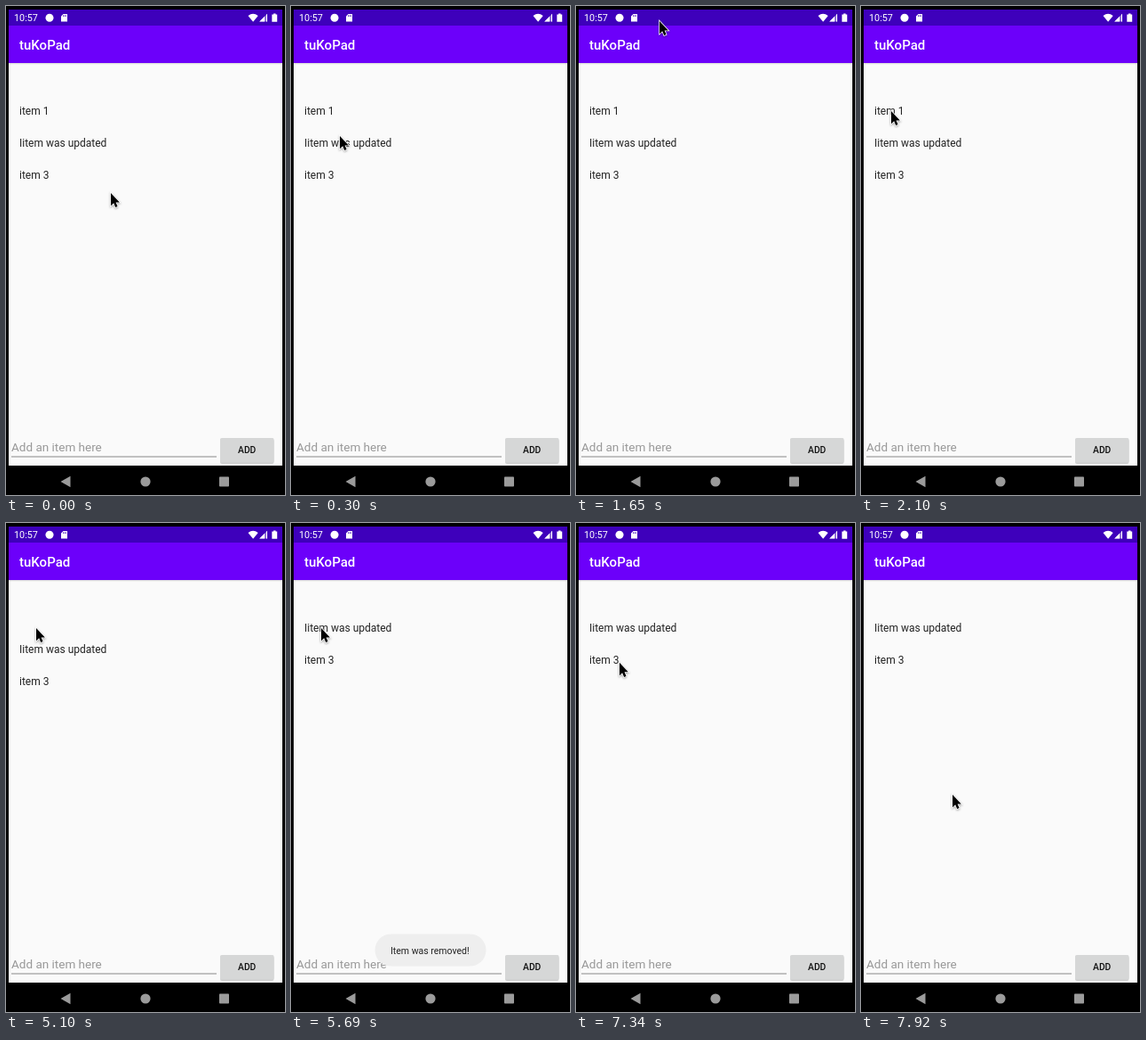
Write an HTML page that moves like this. It is 314 by 549 pixels and loops after 8 s.

```html
<!DOCTYPE html>
<html lang="en">
<head>
<meta charset="utf-8">
<title>List app</title>
<style>
  html, body { margin: 0; width: 100%; height: 100%; overflow: hidden; background: #000; }
  svg { display: block; width: 100vw; height: 100vh; font-family: Roboto, sans-serif; }
  .row { font-size: 12px; fill: #222; }
  .bold { font-weight: 500; }
  #cursor { filter: drop-shadow(0 1px 1px rgba(0, 0, 0, .35)); }
</style>
</head>
<body>
<svg viewBox="0 0 314 549">
  <defs>
    <linearGradient id="shade" x2="0" y2="1">
      <stop stop-color="#000" stop-opacity=".15"/>
      <stop offset="1" stop-color="#000" stop-opacity="0"/>
    </linearGradient>
  </defs>
  <rect width="314" height="549"/>
  <rect x="3" y="4" width="308" height="512" fill="#fafafa"/>
  <rect x="3" y="4" width="308" height="18" fill="#3e00bb"/>
  <rect x="3" y="22" width="308" height="42" fill="#6c00fa"/>
  <rect x="3" y="64" width="308" height="2" fill="url(#shade)"/>

  <g fill="#fff">
    <text x="9" y="17" font-size="10.8">10:57</text>
    <circle cx="49" cy="13.2" r="4.5"/>
    <path d="M64.5 9H69V17.6H62V11.6Z"/>
    <path d="M64.6 10.2V12M66 10.2V12M67.4 10.2V12" stroke="#3e00bb" stroke-width=".7"/>
    <path d="M272.5 11Q278 6.4 283.7 11L278.1 17.8Z"/>
    <path d="M285.2 17.6L294 8.8V17.6Z" opacity=".45"/>
    <path d="M285.2 17.6L291 11.8V17.6ZM293 9.8L294 8.8V17.6H293Z"/>
    <path d="M299.3 9.6H301V8.6H303.6V9.6H305.2V17.8H299.3Z"/>
    <text class="bold" x="15" y="49" font-size="15">tuKoPad</text>
  </g>

  <text id="first" class="row" x="15" y="122">item 1</text>
  <g id="rest" class="row">
    <text x="15" y="122">Iitem was updated</text>
    <text x="15" y="158">item 3</text>
  </g>

  <text x="6" y="500" font-size="13.5" fill="#999">Add an item here</text>
  <path d="M6 506H237" stroke="#888"/>
  <rect x="241" y="486" width="60.5" height="28" rx="2" opacity=".18"/>
  <rect x="241" y="485" width="60.5" height="27.7" rx="1.7" fill="#d6d7d7"/>
  <text class="bold" x="271.2" y="502" font-size="10.3" text-anchor="middle" fill="#111">ADD</text>

  <g fill="#9b9b9b">
    <path d="M61.5 534L72.5 527.8V540.2Z"/>
    <circle cx="157" cy="534" r="5.6"/>
    <rect x="240" y="528.6" width="11" height="11" rx=".8"/>
  </g>

  <g id="toast">
    <rect x="94.5" y="461.5" width="125" height="36" rx="18" fill="#eee"/>
    <text x="112" y="484" font-size="10.5" fill="#222">Item was removed!</text>
  </g>

  <path id="cursor" d="M1 1V15.3L4.2 12.3L6.2 17.1L8.6 16.1L6.6 11.4H10.9Z" stroke="#fff" stroke-width="1.5" paint-order="stroke"/>
</svg>
<script>
  const LOOP = 8000, STEP = 145, ROW = 36;
  const HOME = [117, 209];
  // Cursor moves along curves: start ms, number of steps, bend point, end point.
  const legs = [
    { start: 150, steps: 2, bend: [75, 160], end: [54, 145] },
    { start: 750, steps: 3, bend: [458, 396], end: [89, 105] },
    { start: 1350, steps: 6, bend: [125, -79], end: [33, 117] },
    { start: 6290, steps: 6, bend: [120, 121], end: [104, 117] },
    { start: 7340, steps: 5, bend: [-71, 215], end: [102, 304] }
  ];

  const el = id => document.getElementById(id);
  const move = (id, x, y) => el(id).setAttribute("transform", `translate(${x} ${y})`);
  const fade = (id, opacity) => el(id).setAttribute("opacity", opacity);

  // Rises from 0 to 1 in equal jumps, the first one at start.
  const ramp = (t, start, steps) =>
    t < start ? 0 : Math.min(1, (Math.floor((t - start) / STEP) + 1) / steps);

  const curve = (a, b, c, u) =>
    a.map((v, i) => (1 - u) ** 2 * v + 2 * u * (1 - u) * b[i] + u * u * c[i]);

  const cursorAt = t => legs.reduce(
    (from, { start, steps, bend, end }) => curve(from, bend, end, ramp(t, start, steps)), HOME);

  function draw(t) {
    move("cursor", ...cursorAt(t));
    fade("first", t < 5100 ? 1 : 0);
    move("rest", 0, ROW * (1 - ramp(t, 5100, 3)));
    fade("toast", ramp(t, 5390, 3) * (1 - ramp(t, 6290, 5) ** 2));
  }

  const begin = performance.now();
  function tick() {
    draw((performance.now() - begin) % LOOP);
    requestAnimationFrame(tick);
  }
  tick();
</script>
</body>
</html>
```
